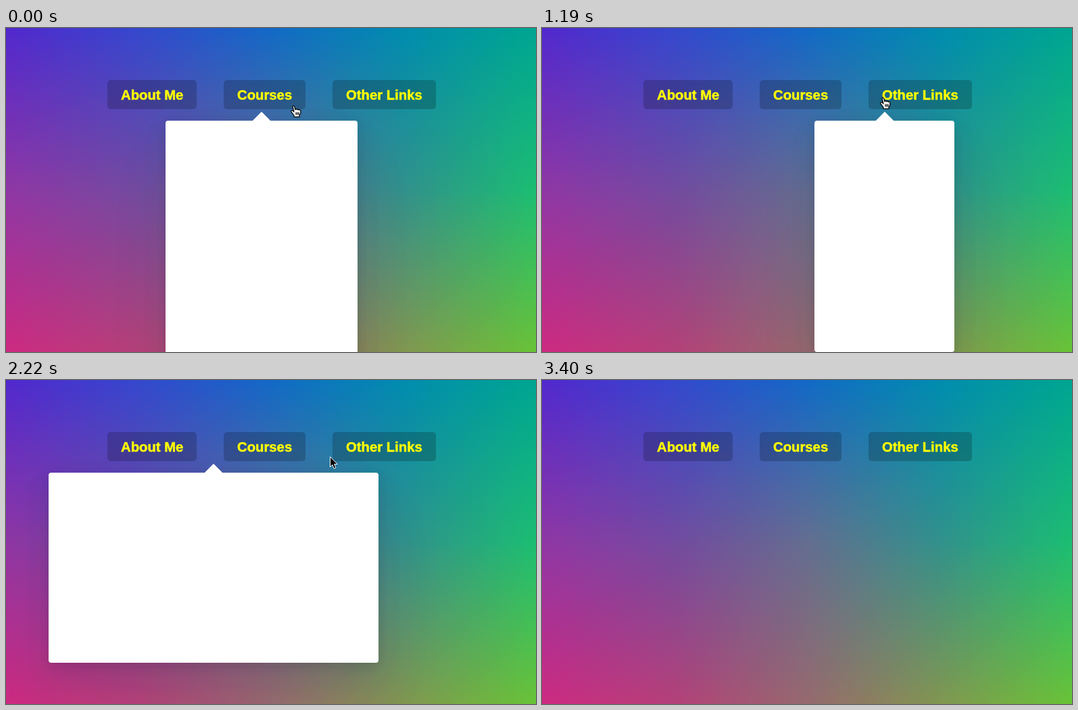
These frames come from a looping animation (784 by 479 pixels, 4300 ms). An HTML page:

```html
<!DOCTYPE html>
<html lang="en">
<head>
<meta charset="utf-8">
<title>Follow-along dropdown</title>
<style>
  html, body { margin: 0; width: 100%; height: 100%; overflow: hidden; }
  body {
    position: relative;
    isolation: isolate;
    font: bold 20.3px/23px "Liberation Sans", Arial, sans-serif;
    background: linear-gradient(90deg, #9037a5, #734ba0 25%, #646e91 50%, #32918c 75%, #1cbe73);
  }
  body::before, body::after { content: ""; position: absolute; inset: 0; z-index: -1; }
  body::before {
    background: linear-gradient(90deg, #5228cd, #3448cd 25%, #1269c6 50%, #008caf 75%, #00a591);
    mask-image: linear-gradient(#000, transparent 50%);
  }
  body::after {
    background: linear-gradient(90deg, #cd2a80, #b44178 25%, #96696e 50%, #829650 75%, #69c337);
    mask-image: linear-gradient(transparent 50%, #000);
  }
  #panel, nav span, svg { position: absolute; }
  #panel {
    top: 137px;
    background: #fff;
    border-radius: 4px;
    box-shadow: 0 50px 100px rgba(50, 50, 93, .06), 0 15px 35px rgba(50, 50, 93, .14), 0 5px 15px rgba(0, 0, 0, .08);
  }
  #panel::before {
    content: "";
    position: absolute;
    left: 50%;
    top: -9.5px;
    width: 20px;
    height: 20px;
    margin-left: -10px;
    background: #fff;
    transform: rotate(45deg);
  }
  #links { position: relative; padding: 20px; color: #fff; }
  #links div { padding: 11px 10px 9px; margin-bottom: 10px; }
  nav span {
    top: 77px;
    padding: 11px 20px 9px;
    border-radius: 5px;
    background: rgba(0, 0, 0, .2);
    color: #ff0;
    white-space: nowrap;
  }
  nav span, #links { -webkit-text-stroke: .5px; }
  svg { left: 0; top: 0; overflow: visible; pointer-events: none; }
</style>
</head>
<body>
<div id="panel">
  <div id="links">
    <div style="background:#039fee">Quibba</div>
    <div style="background:#3b5a9b">Kinlodge</div>
    <div style="background:#000">Blog</div>
    <div style="background:#ffc600">Course<br>Catalog</div>
  </div>
</div>
<nav>
  <span style="left:150px">About Me</span>
  <span style="left:322px">Courses</span>
  <span style="left:483px">Other Links</span>
</nav>
<svg id="cursor" width="18" height="20" stroke-linejoin="round">
  <path id="arrow" transform="translate(-3 -3)" d="M.5 .5v15l3.4-3.2 2.3 5.6 2.7-1.1-2.3-5.4h4.6z" stroke="#fff"/>
  <path id="hand" transform="translate(-5 -1)" fill="#fff" stroke="#000" stroke-width="1.2"
    d="M5 17.3V15L1 9.8C0 8.3 2 7.2 3.2 8.4L5 10 3.3 3C2.8.8 5 .2 5.6 2.2L7 7C7.2 5.2 9.4 5.2 9.6 7 10 5.6 12 5.8 12.2 7.4 12.8 6.4 14.8 6.8 14.8 8.6V12L13 15v2.3zM8 10.5v4M10 10.5v4M12 10.5v4"/>
</svg>
<script>
  const $ = id => document.getElementById(id);
  const LOOP = 4300, STEP = 147.7;          // the picture is held for one STEP
  const LINKS_AT = 19, PANEL_END = 20, POINTER_END = 23;

  // Resting panel of each menu entry: centre, width, height.
  const about = [216, 540, 170], courses = [382.5, 241, 500], other = [559.5, 193, 275];

  // Key poses as [step, values]; some moves turn round before they come to rest.
  const panelKeys = [
    [0, [378, 284, 500]], [2, [365, 306, 500]], [4, about],
    [5, [385.5, 379, 500]], [7, courses], [7.5, courses], [9, other],
    [10, [477, 216, 301]], [12, courses], [12.8, courses], [14, about],
    [15, [307, 488, 281]], [17, other]
  ];
  const pointerKeys = [
    [0, [426, 115]], [2, [284, 110]], [3, [284, 110]], [5, [346, 111]],
    [8, [505, 103]], [10, [415, 107]], [13, [252, 118]], [15, [482, 116]],
    [19, [644, 312]], [20, [714, 397]], [22, [755, 479]]
  ];

  const linear = p => p;
  const easeOut = p => 1 - (1 - p) ** 3;

  function valuesAt(keys, step, ease) {
    const next = keys.findIndex(([at]) => at > step);
    if (next < 0) return keys.at(-1)[1];
    const [t0, from] = keys[next - 1], [t1, to] = keys[next];
    const p = ease((step - t0) / (t1 - t0));
    return from.map((value, i) => value + (to[i] - value) * p);
  }

  const show = (id, visible) => { $(id).style.display = visible ? "block" : "none"; };

  function draw(time) {
    const step = Math.floor(time / STEP);

    const [centre, width, height] = valuesAt(panelKeys, step, easeOut);
    const left = Math.round(centre - width / 2);
    Object.assign($("panel").style, {
      left: left + "px", width: Math.round(width) + "px", height: Math.round(height) + "px"
    });
    show("panel", step < PANEL_END);
    show("links", step === LINKS_AT);

    const [x, y] = valuesAt(pointerKeys, step, linear).map(Math.round);
    const overTarget = document.elementFromPoint(x, y)?.closest("span, #panel");
    $("cursor").style.transform = `translate(${x}px, ${y}px)`;
    show("cursor", step < POINTER_END);
    show("hand", overTarget);
    show("arrow", !overTarget);
  }

  const start = performance.now();
  function tick() {
    draw((performance.now() - start) % LOOP);
    requestAnimationFrame(tick);
  }
  tick();
</script>
</body>
</html>
```
